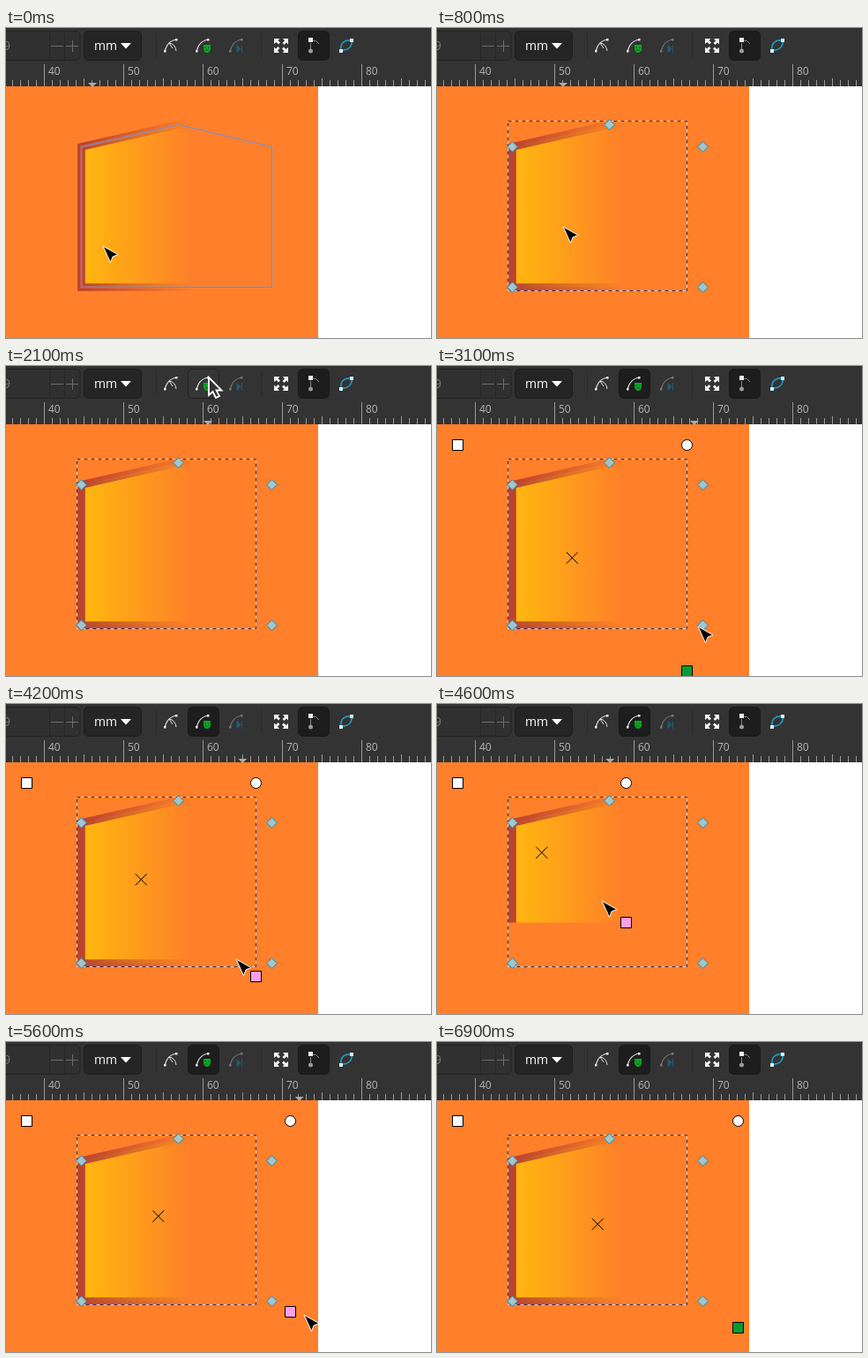
Write an HTML page that moves like this. It is 482 by 351 pixels and loops after 7300 ms.

```html
<!DOCTYPE html>
<html lang="en">
<head>
<meta charset="utf-8">
<style>
html, body { margin: 0; width: 100%; height: 100%; overflow: hidden; background: #333; }
svg { display: block; }
text { font-family: "Open Sans", "Noto Sans", sans-serif; }
</style>
</head>
<body>
<svg width="482" height="351" viewBox="0 0 482 351" fill="none">
  <defs>
    <linearGradient id="fill" gradientUnits="userSpaceOnUse" x1="86" x2="212" y1="0" y2="0">
      <stop stop-color="#ffb80e"/><stop offset="1" stop-color="#ff7f2a"/>
    </linearGradient>
    <linearGradient id="edge" gradientUnits="userSpaceOnUse" x1="86" x2="212" y1="0" y2="0">
      <stop stop-color="#bb432f"/><stop offset="1" stop-color="#bb432f" stop-opacity="0"/>
    </linearGradient>
    <clipPath id="crop"><rect id="cropBox" x="23" y="90"/></clipPath>
    <path id="house" d="M85.5 293.5V134.5L195.5 109.5L301.5 134.5V293.5Z"/>
    <path id="diamond" d="M0-5.800L5.800 0L0 5.800L-5.800 0Z" fill="#a5c5cb" stroke="#1193c4"/>
    <path id="frame" d="M80.5 105.5H283.5V297.5H80.5Z"/>
    <g id="curve">
      <path d="M-7 7C-5-2-1-6 7-7" stroke="currentColor" stroke-width="1.200"/>
      <path d="M-8 5h2.500v2.500h-2.500zM5-8h2.500v2.500h-2.500z" fill="currentColor"/>
    </g>
    <path id="corner" d="M-8-8h6.500l-2 2 2.500 2.500-2 2-2.500-2.500-2.500 2z" fill="#f2f2f2"/>
  </defs>

  <!-- canvas and page -->
  <path d="M0 66H482V351H0Z" fill="#fff"/>
  <path d="M0 66H354V351H0Z" fill="#ff7f2a"/>
  <g id="shape">
    <use href="#house" fill="url(#fill)" stroke="url(#edge)" stroke-width="8.700"/>
  </g>
  <g id="outline">
    <use href="#house" stroke="#c9a3a0" stroke-opacity=".55" stroke-width="2"/>
    <use href="#house" stroke="#6f80bd" stroke-opacity=".85"/>
  </g>
  <g id="selection">
    <use href="#frame" stroke="#ffffffa0"/>
    <use href="#frame" stroke="#00003cc8" stroke-dasharray="4"/>
    <use href="#diamond" x="85.5" y="134.5"/><use href="#diamond" x="195.5" y="109.5"/>
    <use href="#diamond" x="301.5" y="134.5"/><use href="#diamond" x="85.5" y="293.5"/>
    <use href="#diamond" x="301.5" y="293.5"/>
  </g>
  <g id="handles" stroke="#000">
    <path d="M17.5 83.5h12v12h-12z" fill="#fff"/>
    <circle id="round" cy="89.5" r="6" fill="#fff"/>
    <path id="cross" d="M-6.500-6.500L6.500 6.500M6.500-6.500L-6.500 6.500"/>
    <path id="grip" d="M-6-6H6V6H-6Z"/>
  </g>

  <!-- toolbar -->
  <path d="M0 0H482V66H0Z" fill="#333"/>
  <rect x="-20" y="3.5" width="104" height="33" rx="5" fill="#303030" stroke="#222"/>
  <path d="M49.5 4V36M66.5 4V36" stroke="#282828"/>
  <path d="M51 20.5H65M68 20.5H82M75.5 14V27" stroke="#6c6c6c"/>
  <text x="-3" y="25" font-size="14" fill="#777">9</text>
  <rect x="88.5" y="3.5" width="65" height="33" rx="5" fill="#252525" stroke="#1c1c1c"/>
  <text x="100" y="25" font-size="14" fill="#fff">mm</text>
  <path d="M130 17H142L136 23.5Z" fill="#fff"/>
  <path d="M170.5 6V34M289.5 6V34" stroke="#292929"/>
  <rect id="button" x="206.5" y="3.5" width="35" height="33" rx="5"/>
  <rect x="331.5" y="3.5" width="35" height="33" rx="5" fill="#1d1d1d" stroke="#191919"/>
  <g color="#ececec">
    <use href="#curve" x="187" y="20"/>
    <path d="M185 17Q192 18 193 26M185 17L189 23" stroke="#ddd"/>
    <use href="#curve" x="223" y="20"/>
    <path d="M224 19h8v5q-1 4-4 4T224 24Z" fill="#0cab24"/>
    <path d="M225 22h2m2 0h2M226 25h4" stroke="#075b13"/>
  </g>
  <g color="#777">
    <use href="#curve" x="261" y="20"/>
    <path d="M262 19.500L266 23.500L262 27.500ZM267.500 19v9" fill="#235c72" stroke="#235c72"/>
  </g>
  <g transform="translate(312 20)">
    <use href="#corner"/><use href="#corner" transform="rotate(90)"/>
    <use href="#corner" transform="rotate(180)"/><use href="#corner" transform="rotate(270)"/>
  </g>
  <path d="M345.500 17V27M347 14Q352 13 355 18" stroke="#888"/>
  <path d="M343 11h5v5h-5z" fill="#eee"/><circle cx="345.500" cy="26" r="2.500" fill="#999"/>
  <path d="M380 25C379 17 384 13 392 14C393 21 388 26 380 25Z" stroke="#2396bd" stroke-width="1.600"/>
  <path d="M378 24h4v4h-4zM390 12h4v4h-4z" fill="#d8eef7"/>

  <!-- ruler -->
  <path id="ticks" stroke="#999"/>
  <g id="labels" font-size="12" fill="#b5b5b5"></g>
  <path id="marker" d="M-5 62H5L0 67Z" fill="#aaa"/>

  <path id="arrow" d="M0 0L17 9.500L11 12L8.500 18.500Z" fill="#000" stroke="#fff"/>
  <path id="pointer" d="M0 0V20L4.500 16L8 23L12 21L8.500 14.500H14.500Z" fill="#333" stroke="#fff" stroke-width="1.800"/>
</svg>
<script>
const LOOP = 7300, STEP = 100;
const RULER_LAG = 50, GRIP_LAG = 150;
const PRESS = 3600, RELEASE = 6000, LEAVE = 6400;
const $ = id => document.getElementById(id);

// The cursor's route: [time, x, y]; the ruler marker and the grip trail behind it.
const route = [
  [-100, 86, 262], [0, 110, 247], [300, 143, 225], [900, 143, 225], [1700, 222, 52],
  [2100, 230, 13], [2300, 230, 13], [3100, 296, 295], [PRESS, 283, 345],
  [4050, 283, 308], [4200, 261, 289], [4800, 150, 190], [5100, 216, 229],
  [5450, 322, 305], [5600, 338, 309], [5800, 341, 323], [6100, 341, 323], [6300, 11, 205]
];

function cursorAt(t) {
  const i = route.findIndex(k => k[0] > t);
  if (i < 0) return route.at(-1).slice(1);
  const [t0, x0, y0] = route[i - 1], [t1, x1, y1] = route[i];
  const p = (t - t0) / (t1 - t0);
  return [x0 + (x1 - x0) * p, y0 + (y1 - y0) * p];
}

const gripAt = t => cursorAt(Math.min(Math.max(t - GRIP_LAG, PRESS), RELEASE))
  .map(v => Math.floor(v) + 0.5);

function set(id, attrs) {
  for (const name in attrs) $(id).setAttribute(name, attrs[name]);
}
const show = (id, on) => set(id, { display: on ? 'inline' : 'none' });
const move = (id, x, y) => set(id, { transform: `translate(${x} ${y})` });

let ticks = '';
for (let n = -4; n < 49; n++) {
  const top = n % 10 === 0 ? 41 : n % 5 === 0 ? 57 : 59;
  ticks += `M${43.5 + n * 9} ${top}V66`;
}
set('ticks', { d: ticks });
$('labels').innerHTML = [40, 50, 60, 70, 80]
  .map((v, i) => `<text x="${48 + i * 90}" y="53">${v}</text>`).join('');

function draw(t) {
  const [x, y] = cursorAt(t);
  const [gx, gy] = gripAt(t);
  const active = t >= 2300, inside = t < LEAVE;
  const hover = !active && t >= 1900;

  show('outline', t < 500);
  show('selection', t >= 800);
  show('handles', active);
  set('button', {
    fill: active ? '#1d1d1d' : hover ? '#363636' : 'none',
    stroke: active ? '#191919' : hover ? '#222' : 'none'
  });

  set('cropBox', { width: gx - 23, height: gy - 90 });
  set('shape', { 'clip-path': active ? 'url(#crop)' : 'none' });
  set('round', { cx: gx });
  move('grip', gx, gy);
  set('grip', { fill: t >= PRESS && inside ? '#ff9ee8' : '#069b32' });
  move('cross', (23 + gx) / 2, (89 + gy) / 2);

  show('marker', inside);
  move('marker', cursorAt(t - RULER_LAG)[0], 0);
  show('arrow', inside && y >= 36);
  move('arrow', x, y);
  show('pointer', inside && y < 36);
  move('pointer', x, y);
}

function frame() {
  const t = performance.now() % LOOP;
  draw(Math.floor(t / STEP) * STEP);
  requestAnimationFrame(frame);
}
frame();
</script>
</body>
</html>
```
